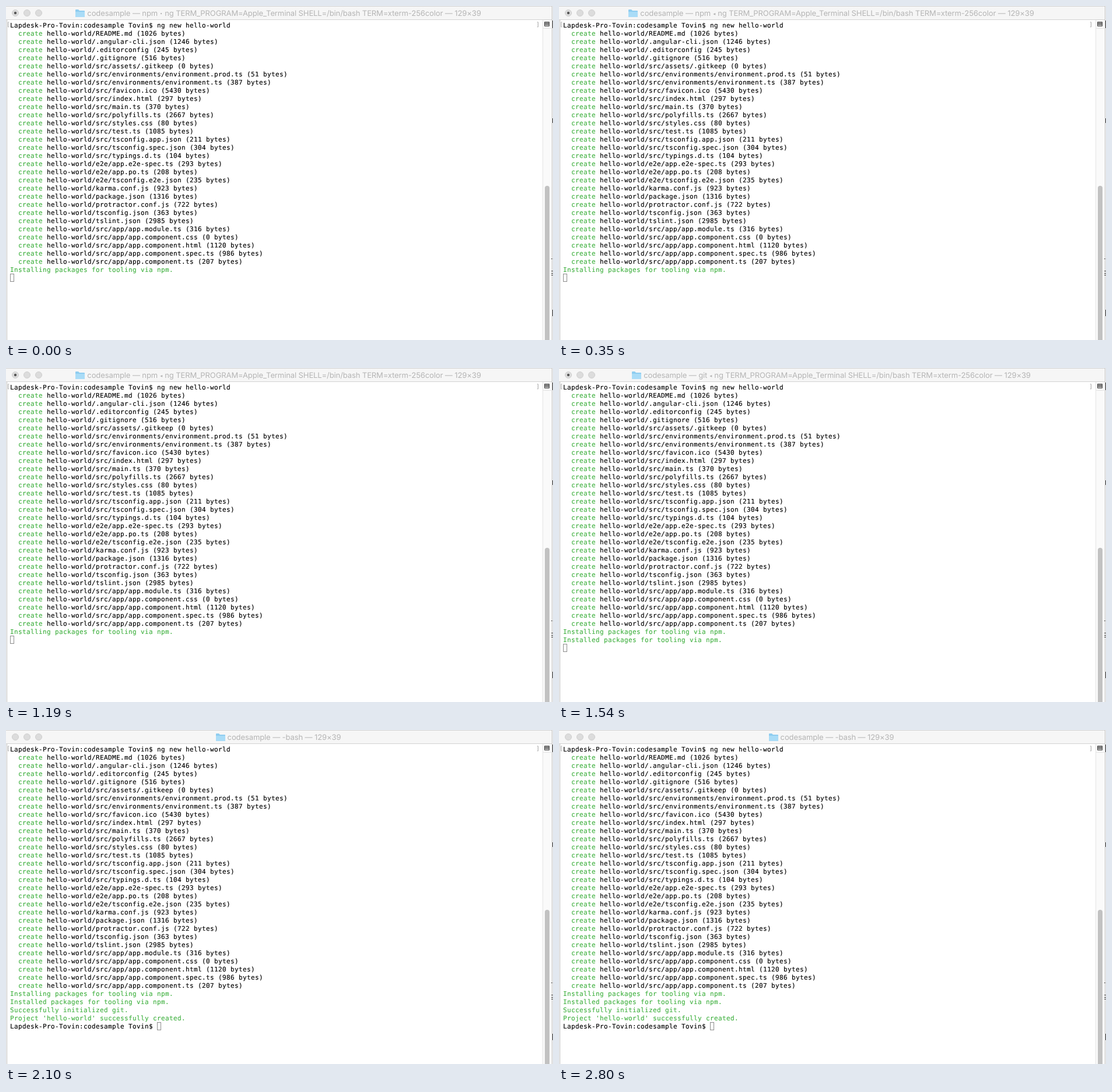
Animation, 938 px wide and 574 px high, one loop 2.87 s. Source, as an HTML page:

```html
<!DOCTYPE html>
<html lang="en">
<head>
<meta charset="utf-8">
<title>Terminal</title>
<style>
html, body { margin: 0; width: 100%; height: 100%; overflow: hidden; background: #fff; }
#stage { position: relative; width: 938px; height: 574px; overflow: hidden; text-rendering: geometricPrecision; }
#stage > * { position: absolute; box-sizing: border-box; }
#bar { left: 0; top: 0; width: 937px; height: 24px; background: #f6f6f6; border: solid #d2d2d2; border-width: 1px 0; }
#title { left: 0; top: 0; width: 934px; height: 25px; display: flex; align-items: center; justify-content: center;
  font: 13px Inter, sans-serif; letter-spacing: -.1px; color: #b4b4b4; white-space: pre; }
#title svg { margin-right: 4px; flex: none; }
#title i { display: inline-block; width: 5px; font: 8px/1 "DejaVu Sans", sans-serif; text-align: center; vertical-align: 1px; }
#text { left: 7px; top: 27px; margin: 0; font: 11px/14px "DejaVu Sans Mono", monospace;
  letter-spacing: calc(7px - 1ch); color: #000; -webkit-text-stroke: .15px; }
#text b { font-weight: normal; color: #41b141; }
.mark { top: 26px; font: 10px/14px "DejaVu Sans Mono", monospace; color: #999; }
#cursor { width: 7px; height: 14px; border: 1px solid #8c8c8c; }
#chrome { left: 0; top: 0; }
</style>
</head>
<body>
<div id="stage">
  <div id="bar"></div>
  <div id="title">
    <svg width="16" height="15"><path d="M0 2q0-1 1-1h4l2 2h8q1 0 1 1v9q0 1-1 1H1q-1 0-1-1z" fill="#8fcdf0"/><path d="M0 5h16v8q0 1-1 1H1q-1 0-1-1z" fill="#a9dcf7"/></svg><span id="caption"></span>
  </div>
  <pre id="text"></pre>
  <span class="mark" style="left:1px">[</span>
  <span class="mark" style="left:909px">]</span>
  <div id="cursor"></div>
  <svg id="chrome" width="938" height="574">
    <g fill="#dcdcdc" stroke="#cfcfcf">
      <circle cx="16" cy="12" r="5.5"/><circle cx="36" cy="12" r="5.5"/><circle cx="56" cy="12" r="5.5"/>
    </g>
    <circle id="busy" cx="16" cy="12" r="2.2" fill="#555"/>
    <path d="M920 24h16v550h-16z" fill="#fafafa"/>
    <path d="M920.5 24v550M921 38.5h14" stroke="#e4e4e4"/>
    <path d="M1.5 24v550M936.5 0v574" stroke="#bdbdbd"/>
    <rect x="924" y="309" width="8" height="273" rx="4" fill="#c2c2c2"/>
    <path d="M923.5 27.5h8v7h-8zM924 29.5h7M924 31.5h7" fill="#bbb" stroke="#444"/>
    <path d="M937.5 25v13M937.5 193v8M937.5 522v11M935 434.5h2M935 455.5h3M935 459.5h3M935 462.5h3" stroke="#444"/>
  </svg>
</div>
<script>
const LOOP = 2870, INSTALLED = 1400, DONE = 1610;
const $ = id => document.getElementById(id);
const green = s => `<b>${s}</b>`;
const prompt = 'Lapdesk-Pro-Tovin:codesample Tovin$ ';

const files = `README.md 1026,.angular-cli.json 1246,.editorconfig 245,.gitignore 516,src/assets/.gitkeep 0,
src/environments/environment.prod.ts 51,src/environments/environment.ts 387,src/favicon.ico 5430,
src/index.html 297,src/main.ts 370,src/polyfills.ts 2667,src/styles.css 80,src/test.ts 1085,
src/tsconfig.app.json 211,src/tsconfig.spec.json 304,src/typings.d.ts 104,e2e/app.e2e-spec.ts 293,
e2e/app.po.ts 208,e2e/tsconfig.e2e.json 235,karma.conf.js 923,package.json 1316,protractor.conf.js 722,
tsconfig.json 363,tslint.json 2985,src/app/app.module.ts 316,src/app/app.component.css 0,
src/app/app.component.html 1120,src/app/app.component.spec.ts 986,src/app/app.component.ts 207`;

const start = [
  prompt + 'ng new hello-world',
  ...files.split(',').map(entry => {
    const [path, size] = entry.trim().split(' ');
    return `  ${green('create')} hello-world/${path} (${size} bytes)`;
  }),
  green('Installing packages for tooling via npm.')
];
const installed = [...start, green('Installed packages for tooling via npm.')];
const done = [...installed, green('Successfully initialized git.'),
  green("Project 'hello-world' successfully created."), prompt];

const caption = job => `codesample — ${job} — 129×39`;
const running = (tool, sep) => caption(
  `${tool} <i>${sep}</i> ng TERM_PROGRAM=Apple_Terminal SHELL=/bin/bash TERM=xterm-256color`);

const phases = [
  { from: 0, title: running('npm', '•'), lines: start },
  { from: 70, title: running('npm', '◂'), lines: start },
  { from: INSTALLED, title: running('git', '◂'), lines: installed },
  { from: DONE, title: caption('-bash'), lines: done, idle: true }
];

let shown;
function show(phase) {
  if (phase === shown) return;
  shown = phase;
  const { title, lines, idle } = phase;
  $('caption').innerHTML = title;
  $('text').innerHTML = lines.join('\n');
  $('busy').style.display = idle ? 'none' : '';
  $('cursor').style.left = 7 + (idle ? prompt.length * 7 : 0) + 'px';
  $('cursor').style.top = 26 + 14 * (lines.length - (idle ? 1 : 0)) + 'px';
}

const origin = performance.now();
function tick() {
  const t = (performance.now() - origin) % LOOP;
  show(phases.filter(p => p.from <= t).pop());
  requestAnimationFrame(tick);
}
tick();
</script>
</body>
</html>
```
